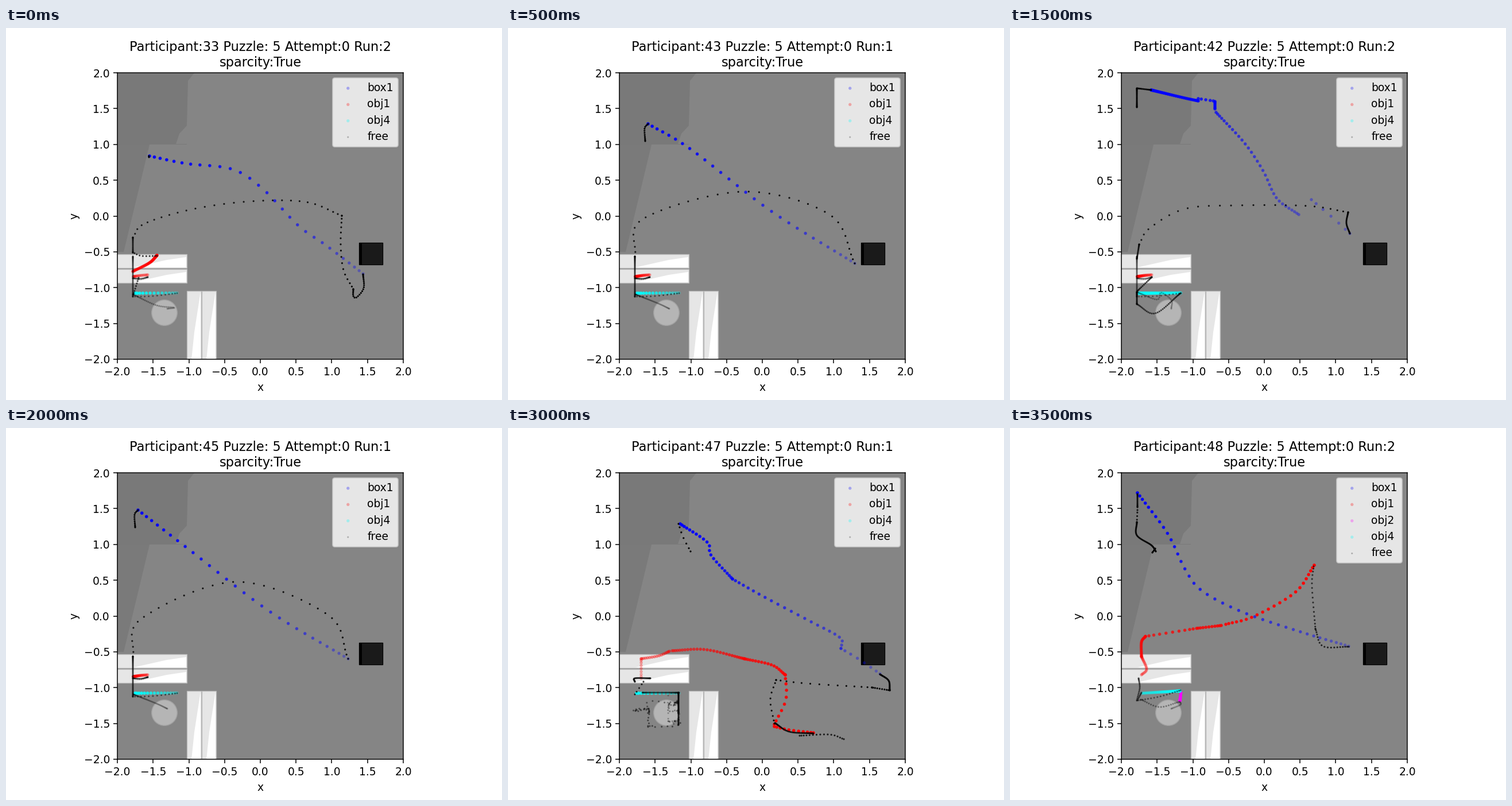
A matplotlib script for the animation above (4000 ms loop, 864 by 648 pixels).

```python
import numpy as np
import matplotlib.pyplot as plt
from matplotlib.animation import FuncAnimation
from matplotlib.colors import to_rgb
from matplotlib.patches import Circle, Polygon

plt.rcParams["font.family"] = "DejaVu Sans"

# Points are noted in stage pixels and mapped to the plot's units.
WIDTH, HEIGHT = 864, 648
LEFT, TOP, RIGHT, BOTTOM = 194, 78, 692, 577
CENTER = np.array([LEFT + RIGHT, TOP + BOTTOM]) / 2
UNIT = np.array([RIGHT - LEFT, TOP - BOTTOM]) / 4

COLORS = {"box1": "blue", "obj1": "red", "obj2": "magenta",
          "obj4": "cyan", "free": "black"}
EASE = 0.5


def to_data(points):
    return (np.asarray(points, float) - CENTER) / UNIT


def spline(points, steps=40):
    """Catmull-Rom curve through the key points."""
    p = np.asarray(points, float)
    p = np.vstack([2 * p[0] - p[1], p, 2 * p[-1] - p[-2]])
    t = np.linspace(0, 1, steps)[:, None]
    return np.vstack([
        b + 0.5 * t * (c - a + t * (2 * a - 5 * b + 4 * c - d
                                    + t * (3 * (b - c) + d - a)))
        for a, b, c, d in zip(p, p[1:], p[2:], p[3:])])


def path(kind, count, *points):
    """Dots along a curve, closer together where the hand starts and stops."""
    curve = spline(points)
    steps = np.hypot(*np.diff(curve, axis=0).T)
    length = np.concatenate([[0], np.cumsum(steps)])
    t = np.linspace(0, 1, count)
    t += EASE * (t * t * (3 - 2 * t) - t)
    dots = [np.interp(t * length[-1], length, axis) for axis in curve.T]
    return kind, np.column_stack(dots)


def search(seed, bottom, moves):
    """Trial moves of the hand between random places near the disc."""
    rng = np.random.default_rng(seed)
    x = rng.choice([222, 245, 262, 280, 290, 297], moves)
    y = rng.uniform(464, bottom, moves)
    spots = np.column_stack([x, y])
    result = []
    for a, b in zip(spots, spots[1:]):
        corner = (b[0], a[1] + rng.uniform(-4, 4))
        kind, dots = path("free", 9, a, corner, b)
        result.append((kind, dots + rng.normal(0, 1, dots.shape)))
    return result + [path("free", 40, (234, 461), (298, 461)),
                     path("free", 40, (297, 461), (297, bottom - 25)),
                     path("free", 14, (297, bottom - 25), (297, bottom - 4))]


def home(bar, *wander):
    """Slide the bar and the block aside, then follow the wall upwards."""
    return [path("obj4", bar, (298, 461.5), (225, 462)),
            path("obj1", 12, (247, 430), (235, 431), (222, 433)),
            path("free", 34, *wander),
            path("free", 14, (221, 468), (255, 467), (298, 462)),
            path("free", 42, (221, 468), (221, 398)),
            path("free", 12, (221, 436), (235, 437), (247, 434))]


def direct(grab, peak, drop):
    """Reach for the box in one arc and carry it to the corner."""
    return home(16, (281, 489), (262, 480), (222, 464)) + [
        path("free", 36, (221, 398), (236, 332), peak, (560, 325), grab),
        path("box1", 30, grab, (457, 318), (318, 211), drop),
        path("free", 12, drop, (drop[0] - 6, drop[1] + 8),
             (drop[0] - 5, drop[1] + 30))]


RUNS = [
    (33, 2, home(14, (281, 489), (293, 487), (262, 483), (221, 464)) + [
        path("obj1", 24, (221, 424), (250, 409), (263, 396)),
        path("free", 9, (222, 464), (231, 435)),
        path("free", 10, (263, 397), (236, 397), (221, 391)),
        path("free", 14, (221, 391), (221, 365)),
        path("free", 29, (221, 365), (241, 341), (323, 316), (425, 302),
             (522, 303), (585, 327)),
        path("free", 16, (585, 327), (583, 377), (588, 422), (605, 455)),
        path("free", 22, (605, 455), (605, 467), (611, 469), (623, 453),
             (622, 429)),
        path("box1", 29, (622, 428), (558, 379), (509, 344), (447, 280),
             (394, 246), (313, 236), (250, 223)),
        path("free", 2, (249, 223), (249, 225))]),

    (43, 1, direct((604, 410), (410, 285), (244, 167))),

    (44, 1, search(4, 548, 12) + [
        path("obj1", 14, (278, 437), (278, 404)),
        path("obj2", 50, (299, 475), (221, 475)),
        path("obj2", 24, (299, 409), (299, 443)),
        path("obj4", 40, (281, 382), (284, 410), (290, 448)),
        path("free", 20, (221, 409), (240, 417), (284, 409)),
        path("free", 10, (246, 418), (273, 429), (298, 445)),
        path("free", 32, (273, 437), (278, 420), (273, 392), (280, 381)),
        path("free", 12, (289, 407), (330, 407)),
        path("free", 38, (330, 407), (365, 412), (457, 412), (545, 425),
             (614, 429)),
        path("box1", 16, (607, 427), (573, 410), (501, 398), (424, 388),
             (344, 377)),
        path("box1", 28, (344, 377), (339, 347), (337, 329)),
        path("box1", 20, (337, 329), (319, 274), (294, 219), (261, 179),
             (239, 166), (233, 170)),
        path("free", 10, (309, 239), (306, 233), (309, 213)),
        path("free", 12, (309, 213), (284, 198), (246, 179), (233, 170))]),

    (42, 2, home(50, (281, 489), (281, 474), (263, 461), (256, 473),
                 (221, 460)) + [
        path("free", 34, (221, 481), (253, 497), (297, 462)),
        path("free", 14, (222, 458), (247, 434)),
        path("free", 14, (221, 481), (221, 460)),
        path("free", 14, (221, 402), (225, 377)),
        path("free", 26, (225, 377), (243, 349), (305, 315), (397, 309),
             (519, 310), (589, 321)),
        path("free", 22, (589, 321), (586, 340), (592, 358)),
        path("box1", 7, (592, 358), (565, 333), (525, 299)),
        path("box1", 32, (503, 325), (465, 297), (441, 249), (409, 201),
             (359, 147)),
        path("box1", 8, (357, 141), (357, 128)),
        path("box1", 5, (354, 127), (328, 123)),
        path("box1", 30, (328, 127), (300, 121), (246, 108)),
        path("free", 12, (246, 108), (221, 105)),
        path("free", 18, (221, 106), (221, 138))]),

    (45, 1, direct((596, 402), (400, 268), (230, 143))),

    (46, 2, home(36, (281, 490), (288, 498), (276, 479), (266, 462),
                 (223, 464)) + [
        path("free", 12, (221, 402), (228, 347), (228, 311)),
        path("free", 28, (228, 311), (250, 266), (369, 237), (479, 262),
             (560, 333), (589, 377)),
        path("free", 10, (590, 377), (590, 389)),
        path("box1", 32, (590, 388), (550, 344), (474, 277), (379, 208),
             (307, 160), (221, 129)),
        path("free", 10, (221, 128), (221, 148)),
        path("free", 14, (222, 152), (228, 177), (231, 188))]),

    (47, 1, search(7, 521, 12) + [
        path("obj4", 14, (298, 462), (224, 462)),
        path("free", 24, (248, 436), (221, 436), (221, 442)),
        path("free", 5, (221, 464), (236, 442)),
        path("obj1", 9, (232, 436), (232, 402)),
        path("obj1", 16, (232, 402), (262, 397), (281, 389)),
        path("obj1", 28, (286, 388), (344, 386), (412, 402)),
        path("obj1", 18, (412, 402), (460, 413), (483, 430)),
        path("obj1", 10, (483, 430), (484, 473), (464, 516)),
        path("obj1", 11, (464, 520), (490, 526), (532, 531)),
        path("free", 16, (585, 542), (560, 534), (508, 536)),
        path("free", 34, (532, 532), (490, 529), (465, 514)),
        path("free", 10, (464, 515), (457, 473), (467, 439)),
        path("free", 14, (467, 439), (521, 445), (634, 452)),
        path("free", 10, (634, 452), (665, 457)),
        path("free", 24, (665, 457), (663, 440), (648, 429)),
        path("box1", 8, (648, 428), (610, 402), (580, 384)),
        path("box1", 23, (580, 384), (578, 365), (525, 336), (444, 293),
             (391, 263)),
        path("box1", 22, (391, 263), (354, 222), (347, 199), (300, 167)),
        path("free", 7, (297, 167), (305, 190), (318, 215))]),

    (48, 2, [
        path("free", 12, (281, 489), (297, 482), (296, 477)),
        path("obj2", 14, (298, 460), (296, 475)),
        path("free", 20, (295, 477), (260, 486), (228, 473)),
        path("free", 18, (221, 475), (260, 468), (297, 457)),
        path("obj4", 28, (230, 462), (296, 458)),
        path("free", 24, (229, 461), (221, 475), (226, 453), (224, 436)),
        path("obj1", 18, (229, 430), (238, 420), (229, 398)),
        path("obj1", 22, (229, 398), (229, 373), (236, 363)),
        path("obj1", 10, (236, 363), (319, 350)),
        path("obj1", 11, (325, 349), (368, 344)),
        path("obj1", 22, (376, 342), (425, 328), (497, 286), (530, 239)),
        path("free", 17, (529, 241), (526, 275), (532, 350)),
        path("free", 18, (532, 350), (545, 380), (590, 381)),
        path("box1", 40, (590, 380), (509, 356), (406, 321), (335, 284),
             (305, 246), (274, 183), (222, 113)),
        path("free", 14, (222, 115), (222, 138)),
        path("free", 5, (222, 143), (221, 164)),
        path("free", 36, (221, 164), (221, 187), (246, 204), (254, 215)),
        path("free", 5, (253, 210), (248, 217))]),
]

fig = plt.figure(figsize=(WIDTH / 135, HEIGHT / 135), dpi=135)
ax = fig.add_axes([LEFT / WIDTH, 1 - BOTTOM / HEIGHT,
                   (RIGHT - LEFT) / WIDTH, (BOTTOM - TOP) / HEIGHT])


def shape(color, *points, edge="none"):
    ax.add_patch(Polygon(to_data(points), facecolor=color, edgecolor=edge,
                         linewidth=0.7, zorder=0))


def rect(color, x0, y0, x1, y1, edge="none"):
    shape(color, (x0, y0), (x1, y0), (x1, y1), (x0, y1), edge=edge)


def draw_room():
    ax.set_facecolor("#858585")
    shape("#797979", (193, 77), (329, 77), (317, 92), (315, 170), (302, 184),
          (296, 202), (193, 202))
    shape("#7a7a7a", (193, 202), (250, 203), (205, 390), (193, 390))
    rect("#797979", 193, 201.5, 315, 202.5)
    for y in (394, 420):
        rect("#e6e6e6", 193, y, 315, y + 24, edge="#b9b9b9")
        shape("white", (222, y + 23), (280, y + 10), (314, y + 5),
              (314, y + 23))
    for x in (315, 341):
        rect("#e6e6e6", x, 457.5, x + 25, 578, edge="#b9b9b9")
        shape("white", (x + 24, 459), (x + 13, 530), (x + 8, 578),
              (x + 24, 578))
    for radius, color in ((23, "#a2a2a2"), (21.5, "#b5b5b5")):
        ax.add_patch(Circle(to_data((276, 496)), radius / UNIT[0], color=color,
                            linewidth=0, zorder=0))
    rect("black", 615, 374, 656, 412, edge="black")
    rect("#1a1a1a", 620, 375, 656, 411.5)


def draw_traces(traces):
    for kind, color in COLORS.items():
        parts = [dots for name, dots in traces if name == kind]
        if parts:
            x, y = to_data(np.vstack(parts)).T
            rgba = [(*to_rgb(color), a) for a in np.linspace(0.2, 1, len(x))]
            size = 0.5 if kind == "free" else 4
            ax.scatter(x, y, s=size, c=rgba, label=kind)


def draw(frame):
    participant, run, traces = RUNS[frame]
    ax.clear()
    draw_room()
    draw_traces(traces)
    ticks = np.linspace(-2, 2, 9)
    ax.set(xlim=(-2, 2), ylim=(-2, 2), xticks=ticks, yticks=ticks,
           xlabel="x", ylabel="y")
    ax.set_title(f"Participant:{participant} Puzzle: 5 Attempt:0 Run:{run}\n"
                 "sparcity:True")
    ax.legend(loc="upper right")


anim = FuncAnimation(fig, draw, frames=len(RUNS), interval=500,
                     init_func=lambda: draw(0), repeat=True, repeat_delay=0)
plt.show()
```
